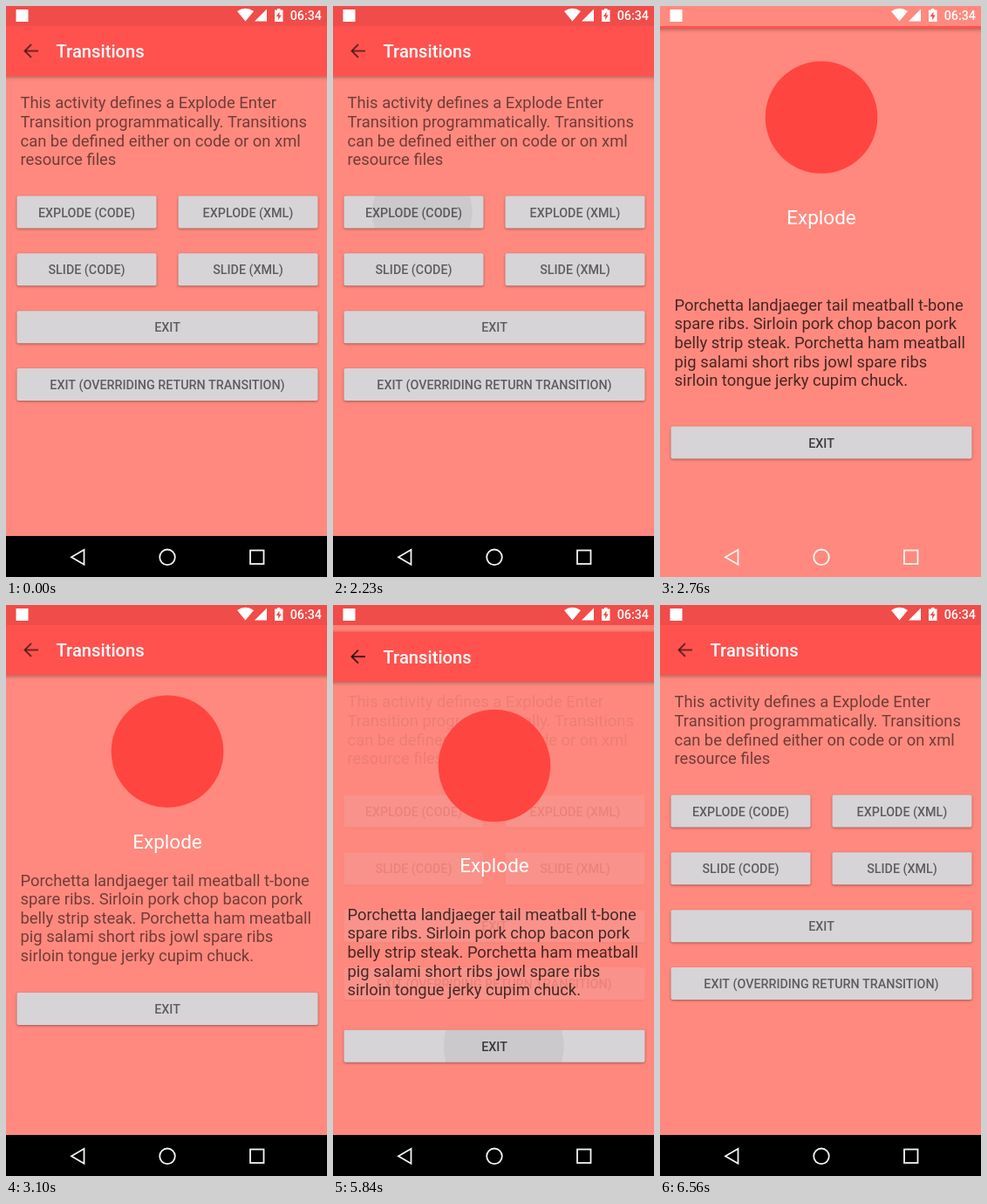
Recreate the animation shown at these times as an HTML page with a canvas. Size 368x654 px, loop 7900 ms.

```html
<!DOCTYPE html>
<html lang="en">
<head>
<meta charset="utf-8">
<title>Activity transition</title>
<style>
  html, body { margin: 0; width: 100%; height: 100%; overflow: hidden; }
  canvas { display: block; }
</style>
</head>
<body>
<canvas id="stage" width="368" height="654"></canvas>
<script>
const ctx = document.getElementById('stage').getContext('2d');
const W = 368, H = 654, TOP = 23, BOTTOM = 607, LOOP = 7900;
const BG = '#ff897e', BAR = '#ff524f', STATUS = '#f04c49';
const INTRO = ['This activity defines a Explode Enter', 'Transition programmatically. Transitions',
  'can be defined either on code or on xml', 'resource files'];
const BODY = ['Porchetta landjaeger tail meatball t-bone', 'spare ribs. Sirloin pork chop bacon pork',
  'belly strip steak. Porchetta ham meatball', 'pig salami short ribs jowl spare ribs',
  'sirloin tongue jerky cupim chuck.'];

const STEPS = [[1710, 2500, 10], [2590, 3100, 7], [5240, 6020, 10], [6110, 6560, 6]];
// Clock of the slide-out: [time, elapsed]
const SLIDE = [[5504, 0], [5840, 336], [6020, 404], [6560, 1148]];

const clamp = v => Math.max(0, Math.min(1, v));
const ramp = (t, a, b) => clamp((t - a) / (b - a));

function stepped(t) {
  let held = 0;
  for (const [a, b, n] of STEPS) {
    if (t < a) break;
    const gap = (b - a) / (n - 1);
    held = Math.min(b, a + Math.floor((t - a) / gap + 0.06) * gap);
  }
  return held;
}

function slideClock(t) {
  let u = 0;
  for (let i = 1; i < SLIDE.length; i++) {
    const [a, from] = SLIDE[i - 1], [b, to] = SLIDE[i];
    u += (to - from) * ramp(t, a, b);
  }
  return u;
}

// Explode: views closest to the middle of the screen lead
function explode(t, y) {
  const d = y - 327;
  const left = clamp(0.553 + 0.00046 * Math.abs(d) - (t - 2500) / 870);
  return Math.sign(d) * 375 * left * left;
}

function slide(t, delay) {
  const f = Math.max(0, slideClock(t) - delay) / 1000;
  return H * f * f;
}

function rect(x, y, w, h, color) {
  ctx.fillStyle = color;
  ctx.fillRect(x, y, w, h);
}

function disc(x, y, r, color) {
  ctx.fillStyle = color;
  ctx.beginPath();
  ctx.arc(x, y, r, 0, 7);
  ctx.fill();
}

function path(points, close) {
  ctx.beginPath();
  points.forEach(p => ctx.lineTo(p[0], p[1]));
  if (close) ctx.closePath();
}

function text(s, x, y, size, color, weight = 400, align = 'left') {
  ctx.font = `${weight} ${size}px Roboto, sans-serif`;
  ctx.textAlign = align;
  ctx.fillStyle = color;
  ctx.fillText(s, x, y);
}

function withShadow(blur, draw) {
  ctx.save();
  ctx.shadowColor = 'rgba(0,0,0,.38)';
  ctx.shadowBlur = blur;
  ctx.shadowOffsetY = 1;
  draw();
  ctx.restore();
}

function paragraph(lines, y, ink) {
  lines.forEach((line, i) => text(line, 16.5, y + i * 21.6, 18.4, ink));
}

function button(label, x, y, w, ink, ripple) {
  ctx.save();
  ctx.beginPath();
  ctx.roundRect(x, y, w, 37, 2);
  withShadow(3, () => { ctx.fillStyle = '#d6d4d7'; ctx.fill(); });
  if (ripple && ripple.r > 0) {
    ctx.clip();
    disc(ripple.x, y + 18.5, ripple.r, 'rgba(0,0,0,.05)');
  }
  ctx.restore();
  text(label, x + w / 2, y + 24, 14.3, ink, 500, 'center');
}

function toolbar(y, ink) {
  withShadow(5, () => rect(-6, y + TOP, W + 12, 57, BAR));
  ctx.strokeStyle = ink;
  ctx.lineWidth = 2;
  path([[37, y + 51.5], [22, y + 51.5]]);
  ctx.stroke();
  path([[29, y + 44], [21.5, y + 51.5], [29, y + 59]]);
  ctx.stroke();
  text('Transitions', 57.5, y + 59.2, 20.2, '#fff', 500);
}

function clipContent(draw) {
  ctx.save();
  ctx.beginPath();
  ctx.rect(0, TOP, W, BOTTOM - TOP);
  ctx.clip();
  draw();
  ctx.restore();
}

function menuScreen(t) {
  const ink = 'rgba(0,0,0,.56)';
  const ripple = t < 3100 && { x: 117 - 25 * ramp(t, 1790, 2400), r: 0.16 * (t - 1790) };
  rect(0, 0, W, H, BG);
  toolbar(0, ink);
  rect(0, 0, W, TOP, STATUS);
  paragraph(INTRO, 117.3, ink);
  button('EXPLODE (CODE)', 12.5, 217.5, 160, ink, ripple);
  button('EXPLODE (XML)', 197.5, 217.5, 160, ink);
  button('SLIDE (CODE)', 12.5, 283.3, 160, ink);
  button('SLIDE (XML)', 197.5, 283.3, 160, ink);
  button('EXIT', 12.5, 349.2, 345, ink);
  button('EXIT (OVERRIDING RETURN TRANSITION)', 12.5, 415, 345, ink);
  rect(0, BOTTOM, W, H - BOTTOM, '#000');
}

function detailScreen(t) {
  const leaving = t > 5504;
  const ink = `rgba(0,0,0,${t < 3100 || leaving ? 0.72 : 0.56})`;
  const shift = (y, delay) => leaving ? slide(t, delay) : explode(t, y);
  const ripple = { x: 200 - 5 * ramp(t, 5330, 5840), r: 0.16 * (t - 5330) };

  ctx.globalAlpha = leaving ? 1 - ramp(t, 5720, 6020) : ramp(t, 2230, 2530);
  rect(0, 0, W, H, BG);
  ctx.globalAlpha = 1;

  clipContent(() => {
    toolbar(shift(52, 148), ink);
    disc(185, 167.7 + shift(168, 98), 64.3, '#ff453f');
    text('Explode', 185, 279 + shift(271, 51), 22.5, '#fff', 400, 'center');
    paragraph(BODY, 321.5 + shift(362, 11), ink);
    button('EXIT', 12.5, 444 + shift(463, 0), 345, ink, ripple);
  });
  rect(0, leaving ? 0 : explode(t, 11), W, TOP, STATUS);
  rect(0, BOTTOM + (leaving ? 0 : explode(t, 631)), W, H - BOTTOM, '#000');
}

function systemIcons() {
  ctx.fillStyle = '#fff';
  ctx.fillRect(11.5, 4, 14, 14);
  ctx.beginPath();                                  // wifi
  ctx.moveTo(274.5, 17.5);
  ctx.lineTo(265, 6);
  ctx.quadraticCurveTo(274.5, -0.5, 284, 6);
  ctx.fill();
  path([[285, 17.5], [299, 3.5], [299, 17.5]], true); // signal
  ctx.fill();
  ctx.fillRect(308, 4.5, 9.5, 13.5);                // battery
  ctx.fillRect(311, 3, 3.5, 2);
  ctx.fillStyle = STATUS;
  path([[313.5, 6.5], [309.8, 12], [312.2, 12], [312, 16], [315.8, 10.5], [313.4, 10.5]], true);
  ctx.fill();
  text('06:34', 362, 16, 14.3, '#fff', 500, 'right');

  ctx.strokeStyle = '#f4f4f4';
  ctx.lineWidth = 1.8;
  path([[75, 631.3], [89.5, 622.8], [89.5, 639.8]], true);
  ctx.stroke();
  ctx.beginPath();
  ctx.arc(185, 631.3, 8.8, 0, 7);
  ctx.stroke();
  ctx.strokeRect(280, 623.5, 15.5, 15.5);
}

function touch(x, y) {
  disc(x, y, 12.5, 'rgba(190,165,205,.4)');
  disc(x, y, 10.5, 'rgba(245,238,243,.85)');
}

function draw(t) {
  menuScreen(t);
  if (t > 2100 && t < 6560) detailScreen(t);
  systemIcons();
  if (t >= 1710 && t < 1870) touch(117.5, 222.5);
  if (t >= 5240 && t < 5400) touch(200.5, 453);
}

function frame() {
  draw(stepped(performance.now() % LOOP));
  requestAnimationFrame(frame);
}
frame();
</script>
</body>
</html>
```
